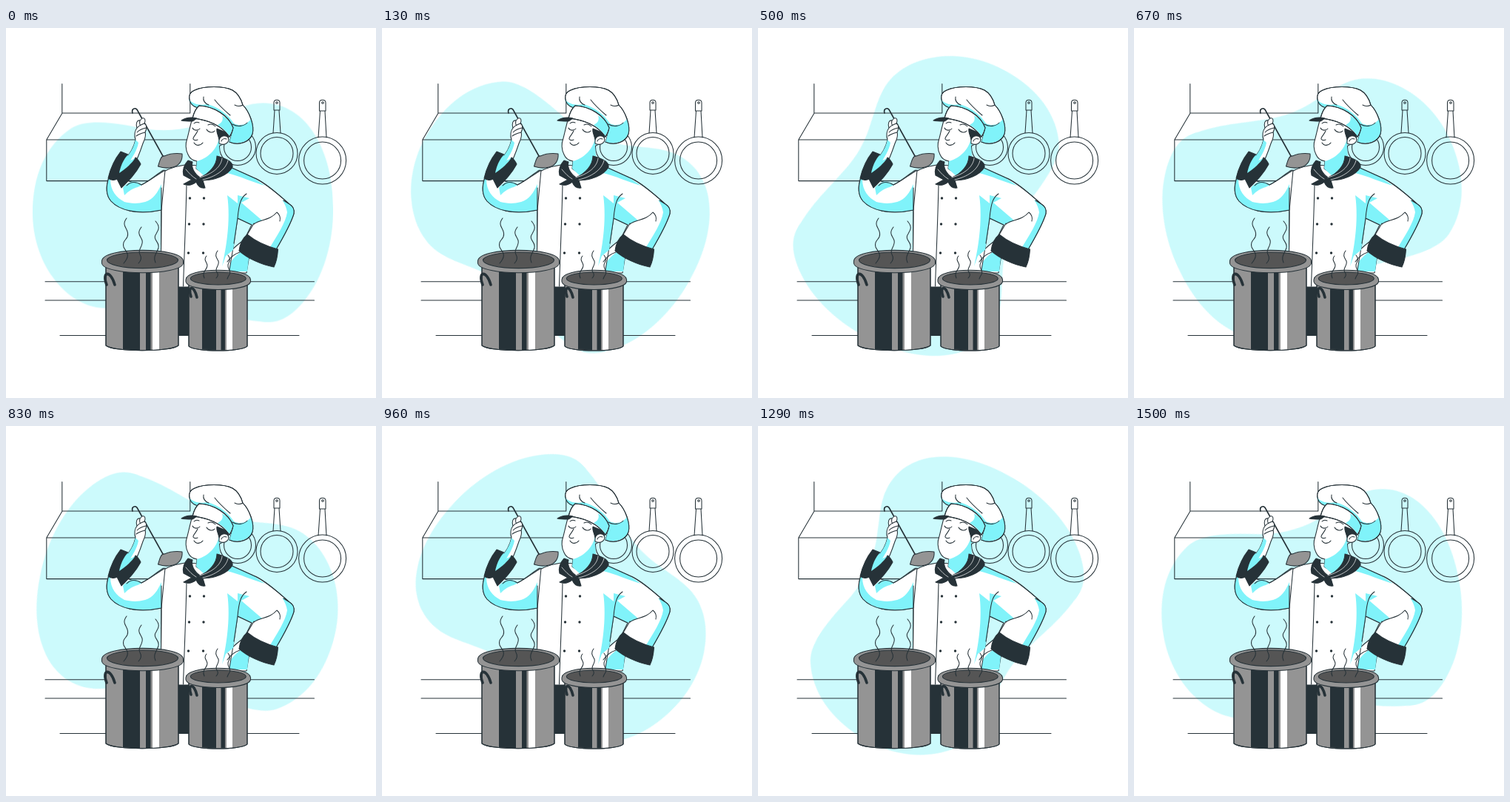
Animation, 500 px wide and 500 px high, one loop 1540 ms. Source, as an HTML page:

```html
<!DOCTYPE html>
<html lang="en">
<head>
<meta charset="utf-8">
<title>Chef tasting soup</title>
<style>
  html, body { margin: 0; width: 100%; height: 100%; overflow: hidden; background: #fff; }
  svg { display: block; width: 100vw; height: 100vh; }
  .blob { fill: #ccfafc; transform-origin: 0 0; animation: spin 1540ms linear infinite; }
  @keyframes spin { to { transform: rotate(360deg); } }
  .line { fill: none; stroke: #263238; stroke-width: 1.05; stroke-linecap: round; stroke-linejoin: round; }
  .white { fill: #fff; }
  .dark { fill: #263238; }
  .grey { fill: #949494; }
  .soup { fill: #555; }
  .shade { fill: #80f3fa; stroke: none; }
  .plain { stroke: none; }
  .fold { stroke: #fff; stroke-width: .7; }
  .grip { stroke-width: 3.6; }
</style>
</head>
<body>
<svg viewBox="0 0 500 500">
  <g transform="translate(242 242)">
    <path class="blob" d="M200 0C201 45 188 95 160 128S112 155 100 154C62 151 25 135 -8 130C-48 124 -72 137 -107 137C-140 137 -165 114 -178 96C-196 72 -206 40 -206 8C-206 -40 -190 -82 -154 -106C-128 -122 -80 -110 -50 -105C30 -96 58 -141 105 -141C165 -141 200 -75 200 0Z"/>
  </g>

  <!-- kitchen -->
  <g class="line">
    <path d="M75.800 75.500V115H248.800V75.500M76 115L54.800 151V206.600H205M54.800 151H262M53 342.800H416.500M53 368H416.500M73 415.500H396"/>
    <circle cx="313" cy="161" r="24.500"/><circle cx="313" cy="161" r="18.500"/>
    <circle cx="366" cy="169.400" r="28"/><circle cx="366" cy="169.400" r="22"/>
    <path d="M362 111V101C362 96 370 96 370 101V111ZM363 111L361 142M369 111L371 142"/>
    <circle cx="366" cy="101" r="1.300"/>
    <circle cx="427.600" cy="179" r="32"/><circle cx="427.600" cy="179" r="25"/>
    <path d="M423.500 112V101C423.500 96 432 96 432 101V112ZM424.500 112L422 148M431 112L433 148"/>
    <circle cx="428" cy="101" r="1.300"/>
  </g>

  <!-- ladle -->
  <g class="line">
    <path class="grey" d="M205.500 187C208 178 210 172 214 173C221 170 230 169 238 170C239 179 234 186 226 188C218 190 211 189 205.500 187Z"/>
    <path d="M171 115C169 108 176 107 178 112L212 173" stroke-width="1.600"/>
  </g>

  <!-- torso and bent arm -->
  <g class="line">
    <path class="dark" d="M231 347H250V415.500H231Z"/>
    <path class="white" d="M322 286C311 294 300 303 297 315C295 322 296 328 300 331H325L330 300Z"/>
    <path class="shade" d="M318 302C309 309 301 316 299 329H326L329 303Z"/>
    <path class="white" d="M242 185C229 187 217 190 208 198L210 250L209 350H298L308 291L313 257L332 266L324 282L364 301C374 284 385 264 389 251C390 245 388 241 383 238C366 223 347 207 334 202L303 188Z"/>
    <path class="shade" d="M299 226L313 237L313 258L307 300L297 308L292 322C297 300 304 262 299 226Z"/>
    <path class="shade" d="M313 226L329 230L318 236L346 260L332 266L313 257Z"/>
    <path class="shade" d="M373 232L384 239C389 243 390 247 388 253C383 269 374 284 366 299L357 296C366 281 378 263 380 249C379 243 377 238 373 232Z"/>
    <path class="shade" d="M302 187L334 202L350 213C332 208 316 200 299 196Z"/>
    <path d="M303 188L334 202C348 207 366 223 383 238C388 241 390 245 389 251C385 264 374 284 364 301M325 281L335 264M332 266L313 257L308 291M325 224C318 229 315 235 313 257M335 265C343 258 356 261 366 249M366 249C371 253 371 257 370 261M375 233L383 238M244 213C243 258 241 304 239.500 349"/>
    <path class="dark" d="M326 279C338 289 352 295 367.500 299C367 307 366 315 362 323C345 320 326 311 315 301C316 292 320 284 326 279Z"/>
    <path d="M299 316C304 309 309 305 316 303"/>
  </g>
  <g class="dark">
    <circle cx="248.500" cy="230" r="1.700"/><circle cx="267.500" cy="230" r="1.700"/>
    <circle cx="247.500" cy="265" r="1.700"/><circle cx="267" cy="265" r="1.700"/>
    <circle cx="246.500" cy="304" r="1.700"/><circle cx="266.500" cy="304" r="1.700"/>
  </g>

  <!-- raised arm -->
  <g class="line">
    <path class="white" d="M160 178C168 170 173 160 175 151C173 145 174 139 177 135C175 129 177 124 181 125L184 122C188 121 189 125 187 129C191 131 190 137 188 141C190 146 187 151 185 156C181 168 178 177 172 187Z"/>
    <path class="shade" d="M160 178C168 170 173 160 175 151L179 155C177 166 171 174 164 186Z"/>
    <path d="M177 135C180 132 183 130 187 129M177 141C181 137 184 136 189 135M176 146C180 143 184 142 188 141M181 125C180 129 181 131 182 132"/>
    <path class="white" d="M139 202C135 214 135 226 142 234C153 246 177 253 210 246L215 192C202 200 192 208 183 212L166 207L150 200Z"/>
    <path class="shade" d="M139 202C135 214 135 226 142 234C153 246 177 253 210 246L210 211C205 222 199 232 188 235C177 238 168 237 160 235C149 229 141 220 141 204Z"/>
    <path class="shade" d="M158 216C168 204 176 207 184 212L178 215C171 217 166 220 160 226Z"/>
    <path d="M139 202C135 214 135 226 142 234C153 246 177 253 210 246L210 216M163 213C169 207 175 207 183 212C195 206 204 197 213 192M210 216L209.500 301"/>
    <path class="dark" d="M155 167C147 177 141 190 138 203C142 206 147 206 150 204L156 216C166 206 175 197 182 184C180 180 178 177 175 175C170 183 163 189 153 196C155 186 159 177 165 171Z"/>
    <path class="shade" d="M165 171C159 177 155 186 153 196C163 189 170 183 175 175C171 179 166 180 163 179Z"/>
  </g>

  <!-- head -->
  <g class="line">
    <path class="white" d="M252 121C249 132 247 141 245 149C242 157 243 165 246 171C248 176 252 179 258 180L257 190L272 200L288 178L287 160L299 154L302 143L290 130Z"/>
    <path class="shade" d="M288 148C286 161 276 175 258 180L257 190L270 202L289 178L288 158L298 156C292 156 289 153 288 148Z"/>
    <path class="dark" d="M285 136L302 143C301 146 299 148 296 148C292 146 289 147 288 151C287 145 284 141 285 136Z"/>
    <path class="white" d="M288 152C289 145 297 144 300 148C303 154 296 160 288 156Z"/>
    <path d="M291 153C292 150 295 149 298 150M252 135C254 139 259 139 262 136M271 137C274 142 280 142 282 139M254 129C256 127 259 127 261 128M273 131C277 129 281 131 283 133M259 139C257 144 252 148 253 150C254 152 257 152 259 151M254 155C257 160 263 159 266 155"/>
  </g>

  <!-- neckerchief -->
  <g class="line">
    <path class="dark" d="M246 179C241 184 238 192 240 199L251 205L240 211C247 214 252 212 257 208C259 213 263 217 269 216L266 206C282 206 300 199 306 188C307 182 301 177 285 173C285 185 275 197 262 202C254 196 250 188 252 181Z"/>
    <path class="fold" d="M262 202C280 197 291 187 292 176M266 205C283 201 297 192 300 179M243 191C248 197 252 201 257 204"/>
  </g>

  <!-- hat -->
  <g class="line">
    <path class="white" d="M257 107C246 103 244 88 255 84C268 78 294 78 306 84C315 89 318 97 320 104C329 113 336 132 333 143C330 153 316 160 302 154L307 137C298 122 278 110 257 107Z"/>
    <path class="shade" d="M247 96C252 103 262 105 272 103C288 107 301 118 308 129C318 134 327 129 331 123C334 131 335 139 332 145C327 154 314 158 302 154L307 137C298 122 278 110 257 107C251 105 248 101 247 96Z"/>
    <path d="M257 107C246 103 244 88 255 84C268 78 294 78 306 84C315 89 318 97 320 104C329 113 336 132 333 143C330 153 316 160 302 154M267 93C266 98 269 102 274 104M282 97C288 105 296 112 303 118M306 130C313 134 321 133 326 128M320 104C317 106 313 106 309 104"/>
    <path class="white" d="M252 122C254 114 257 108 261 105C281 106 301 118 307 135C306 140 304 144 302 147C292 133 275 124 252 122Z"/>
    <path class="shade" d="M292 118C301 124 305 129 307 135L302 146C298 140 293 135 286 131C292 128 294 124 292 118Z"/>
    <path d="M252 122C254 114 257 108 261 105C281 106 301 118 307 135C306 140 304 144 302 147C292 133 275 124 252 122Z"/>
    <path class="dark" d="M237 125C243 121 250 120 258 122L252 126C247 126 242 126 237 125Z"/>
  </g>

  <!-- large pot -->
  <g class="line">
    <path class="grey" d="M135 318V429C145 438 223 438 233 429V318Z"/>
    <path class="dark plain" d="M158 325H181V435.500Q168 435 158 434ZM189 325H195.500V435.300H189Z"/>
    <path class="white plain" d="M198 325H207V434.500L198 435.200Z"/>
    <path d="M135 318V429C145 438 223 438 233 429V318"/>
    <path class="grey" d="M129.500 315C130 295.500 239 295.500 239.500 315V318C236 335 133 335 129.500 318Z"/>
    <ellipse class="soup" cx="184.500" cy="313.800" rx="48" ry="10.800"/>
    <path class="grip" d="M136 347C129 329 141 326 147 347"/>
    <path d="M163 257C154 269 168 271 164 282C162 287 157 288 159 296C161 302 170 305 159 318M183 269C176 278 182 281 184 287C186 295 177 299 181 306C184 311 182 315 179 318M202 261C209 269 206 273 203 278C197 286 208 289 206 297C204 304 198 309 202 317"/>
  </g>

  <!-- small pot -->
  <g class="line">
    <path class="grey" d="M247 342V430C255 438 318 438 326 430V342Z"/>
    <path class="dark plain" d="M265 348H284V435.500Q273 435 265 434.300ZM290.500 348H296V435.300H290.500Z"/>
    <path class="white plain" d="M298 348H306V434.500L298 435.200Z"/>
    <path d="M247 342V430C255 438 318 438 326 430V342"/>
    <path class="grey" d="M243 340C243 323 330 323 330.500 340V343C327 357 246 357 243 343Z"/>
    <ellipse class="soup" cx="286.800" cy="338.500" rx="37.500" ry="8.500"/>
    <path class="grip" d="M250 363C245 348 254 347 258 364"/>
    <path d="M271 308C266 313 272 317 272 321C272 327 264 329 268 338M286 301C281 307 285 311 287 315C289 321 281 325 285 330Q288 334 284 338M300 307C305 313 301 316 300 320C299 326 305 328 302 333Q300 336 299 339"/>
  </g>
</svg>
</body>
</html>
```
